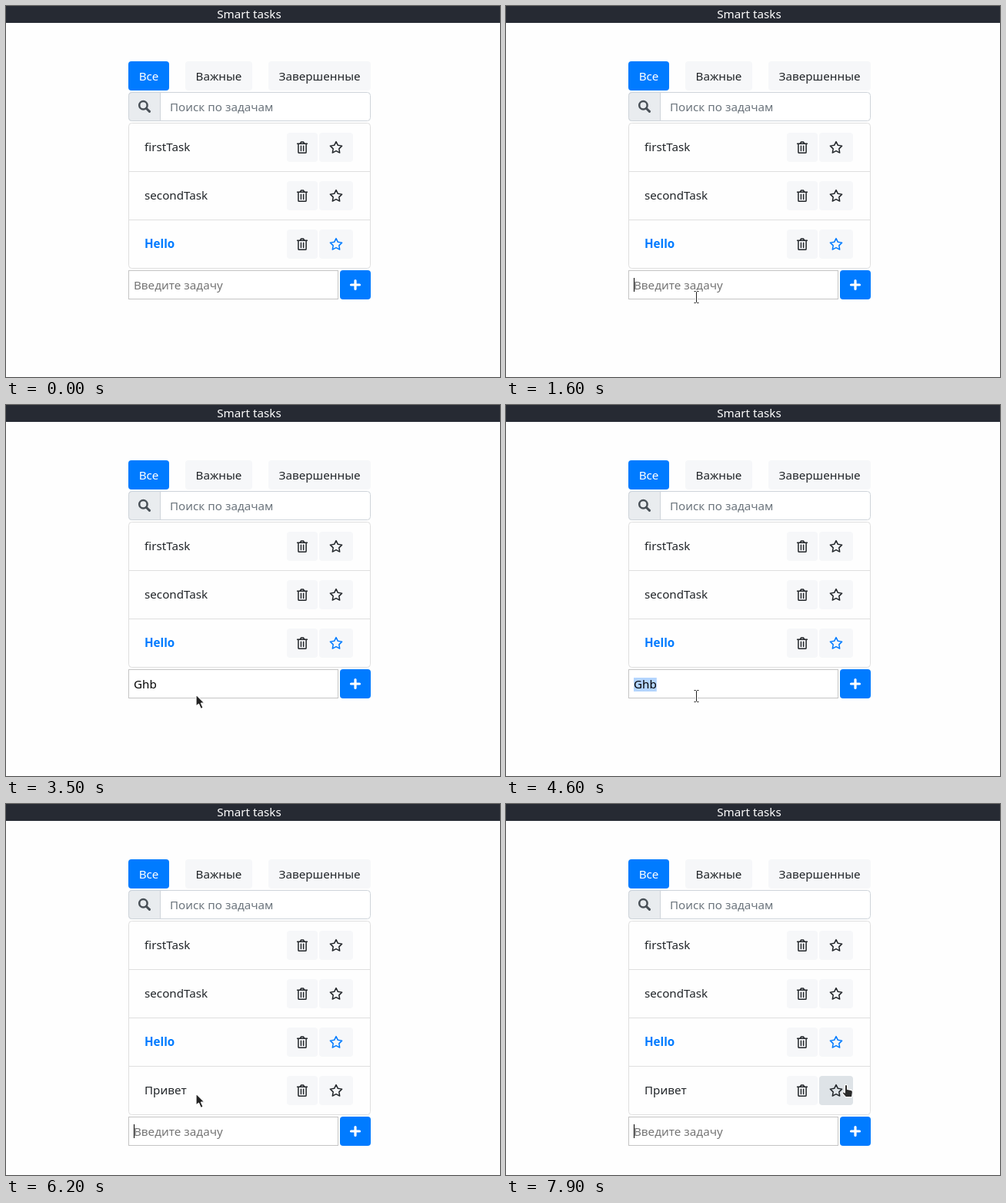
An HTML page for the animation above (8 s loop, 642x483 px).

```html
<!DOCTYPE html>
<html lang="ru">
<head>
<meta charset="utf-8">
<title>Smart tasks</title>
<style>
  html, body { margin: 0; width: 100%; height: 100%; overflow: hidden; background: #fefefe; }
  svg { display: block; }
  text { font: 15.2px "Noto Sans", "Open Sans", sans-serif; fill: #212529; white-space: pre; }
  .line { fill: none; stroke: #212529; stroke-width: 1.5; stroke-linejoin: round; stroke-linecap: round; }
  .edge { fill: none; stroke: #dfdfdf; }
  .light { fill: #f6f7f9; }
  .blue { fill: #007bff; }
  .white { fill: #fff; }
  .important text { fill: #007bff; font-weight: bold; }
  .important .star { stroke: #007bff; }
</style>
</head>
<body>
<svg id="stage" width="642" height="483" viewBox="0 0 642 483"></svg>
<script>
const LOOP = 8000, ROW = 63, LEFT = 166, ADDED = 6200;
const $ = id => document.getElementById(id);

const button = (x, y, w, cls, id = '') =>
  `<rect id="${id}" class="${cls}" x="${x}" y="${y}" width="${w}" height="38" rx="4"/>`;
const label = (x, y, text, attrs = '') => `<text x="${x}" y="${y}" ${attrs}>${text}</text>`;

const starPoints = Array.from({ length: 10 }, (_, i) => {
  const a = i * Math.PI / 5, r = i % 2 ? 4 : 8;
  return `${(429 + r * Math.sin(a)).toFixed(2)},${(32.6 - r * Math.cos(a)).toFixed(2)}`;
}).join(' ');

// One task; coordinates are relative to the top of its row.
const row = (i, text, cls = '') => `
  <g id="row${i}" class="${cls}" transform="translate(0 ${152 + i * ROW})">
    ${label(180, 37, text)}
    ${button(365, 13, 40, 'light', 'trash' + i)}
    ${button(407, 13, 44, 'light', 'star' + i)}
    <path class="line" d="M378.6 27.3h12.8M382.3 27l1.3-2.1h2.8l1.3 2.1M379.9 27.6v10.6q0 1.1 1.1 1.1h8q1.1 0 1.1-1.1V27.6M383.4 30.2v6.3M386.6 30.2v6.3"/>
    <polygon class="line star" points="${starPoints}"/>
    ${i ? '<path class="edge" d="M159.5.5h314"/>' : ''}
  </g>`;

$('stage').innerHTML = `
  <rect width="642" height="22" fill="#262a33"/>
  ${label(316, 16, 'Smart tasks', 'text-anchor="middle" style="fill:#fff"')}
  ${button(159, 72, 53, 'blue')}${button(233, 72, 87, 'light')}${button(341, 72, 133, 'light')}
  ${label(185.5, 97, 'Все', 'text-anchor="middle" style="fill:#fff"')}
  ${label(276.5, 97, 'Важные', 'text-anchor="middle"')}
  ${label(407.5, 97, 'Завершенные', 'text-anchor="middle"')}
  <rect x="159.5" y="112.5" width="314" height="37" rx="4" fill="#fff" stroke="#ced4da"/>
  <path d="M200.5 112.5h-37a4 4 0 0 0-4 4v29a4 4 0 0 0 4 4h37z" fill="#e9ecef" stroke="#ced4da"/>
  <circle cx="178.4" cy="129.3" r="5.2" fill="none" stroke="#495057" stroke-width="2.5"/>
  <path d="M182.3 133.2l4.2 4.2" stroke="#495057" stroke-width="3" stroke-linecap="round"/>
  ${label(213, 137, 'Поиск по задачам', 'style="fill:#6c757d"')}
  ${row(0, 'firstTask')}${row(1, 'secondTask')}${row(2, 'Hello', 'important')}${row(3, 'Привет')}
  <rect id="list" class="edge" x="159.5" y="152.5" width="314" rx="4"/>
  <g id="form">
    <rect x="159.5" y="344.5" width="272" height="37" fill="#fff" stroke="#c4c4c4"/>
    <rect id="selection" y="355" height="18" fill="#b4d5fe"/>
    ${label(LEFT, 369, '', 'id="input"')}
    <path id="caret" d="M.5 354v18" stroke="#000"/>
    ${button(434, 344, 40, 'blue')}
    <path d="M448.5 363h11M454 357.5v11" stroke="#fff" stroke-width="3.2" stroke-linecap="round"/>
  </g>
  <g id="pointer">
    <path id="arrow" d="M0 0v15.3l3.5-3 2.7 6.2 3-1.3-2.7-6h4.6z" fill="#222" stroke="#fff" stroke-width="1.2" stroke-linejoin="round"/>
    <g id="beam" fill="none">
      <path d="M-2.5-7.5h6M-2.5 7.5h6M.5-7v14" stroke="#fff" stroke-width="3"/>
      <path d="M-2.5-7.5h2l1 1 1-1h2M-2.5 7.5h2l1-1 1 1h2M.5-6.5v13" stroke="#222"/>
    </g>
    <path id="hand" d="M-1.6 1.2Q-1.6-.6 0-.6T1.6 1.2V5.4L6.6 6.4Q8.6 7 8.4 9L7.6 15.6H-.4L-4.8 10.6Q-5.2 8.8-3.6 8.8L-1.6 10z" fill="#2b2b2b" stroke="#fff" stroke-width="1.1" stroke-linejoin="round"/>
  </g>`;

// time, text, caret shown, first selected letter
const typing = [
  [0, '', 0], [1600, '', 1], [2200, '', 0], [2300, 'G', 1], [2400, 'Gh', 1], [2500, 'Ghb', 1],
  [3500, 'Ghb', 0], [4000, 'Ghb', 1], [4200, 'Ghb', 0], [4500, 'Ghb', 0, 1], [4600, 'Ghb', 0, 0],
  [4800, '', 0], [4900, '', 1], [5300, 'П', 1], [5500, 'При', 1], [5600, 'Прив', 1],
  [5800, 'Приве', 1], [6000, 'Привет', 1], [ADDED, '', 1], [6800, '', 0], [7200, '', 1]
];

// time, hot spot, shape
const moves = [
  [0, 0, 0, ''],
  [500, 128, 122, 'arrow'], [600, 145, 142, 'arrow'], [700, 157, 156, 'arrow'], [800, 163, 164, 'arrow'],
  [1000, 170, 185, 'arrow'], [1100, 192, 248, 'arrow'], [1200, 220, 326, 'arrow'], [1300, 240, 388, 'arrow'],
  [1400, 246, 405, 'arrow'], [1500, 247, 392, 'arrow'], [1600, 247, 379, 'beam'],
  [3500, 247, 377, 'arrow'], [4000, 247, 379, 'beam'], [ADDED, 247, 377, 'arrow'],
  [7200, 262, 378, 'arrow'], [7300, 318, 377, 'arrow'], [7400, 362, 375, 'arrow'], [7500, 373, 374, 'hand'],
  [7600, 385, 372, 'hand'], [7700, 408, 369, 'hand'], [7800, 431, 367, 'hand'], [7900, 442, 366, 'hand']
];

const latest = (keys, t) => keys.findLast(k => k[0] <= t);
const show = (id, on) => { $(id).style.display = on ? '' : 'none'; };

function draw() {
  const t = performance.now() % LOOP;
  const [, text, caret, from] = latest(typing, t);
  const [, x, y, shape] = latest(moves, t);
  const added = t >= ADDED;

  show('row3', added);
  $('list').setAttribute('height', 3 * ROW + (added ? ROW : 0));
  $('form').setAttribute('transform', `translate(0 ${added ? ROW : 0})`);

  const input = $('input');
  input.textContent = text || 'Введите задачу';
  input.style.fill = text ? '#000' : '#757575';
  const offset = n => n ? input.getSubStringLength(0, n) : 0;
  show('caret', caret);
  $('caret').setAttribute('transform', `translate(${LEFT + Math.round(offset(text.length))} 0)`);

  const selected = from !== undefined;
  show('selection', selected);
  if (selected) {
    $('selection').setAttribute('x', LEFT + offset(from));
    $('selection').setAttribute('width', offset(text.length) - offset(from));
  }

  for (const id of ['arrow', 'beam', 'hand']) show(id, id === shape);
  $('pointer').setAttribute('transform', `translate(${x} ${y})`);
  $('trash3').style.fill = shape === 'hand' && x < 406 ? '#e2e6ea' : '';
  $('star3').style.fill = shape === 'hand' && x > 406 ? '#dee3e7' : '';

  requestAnimationFrame(draw);
}
draw();
</script>
</body>
</html>
```
